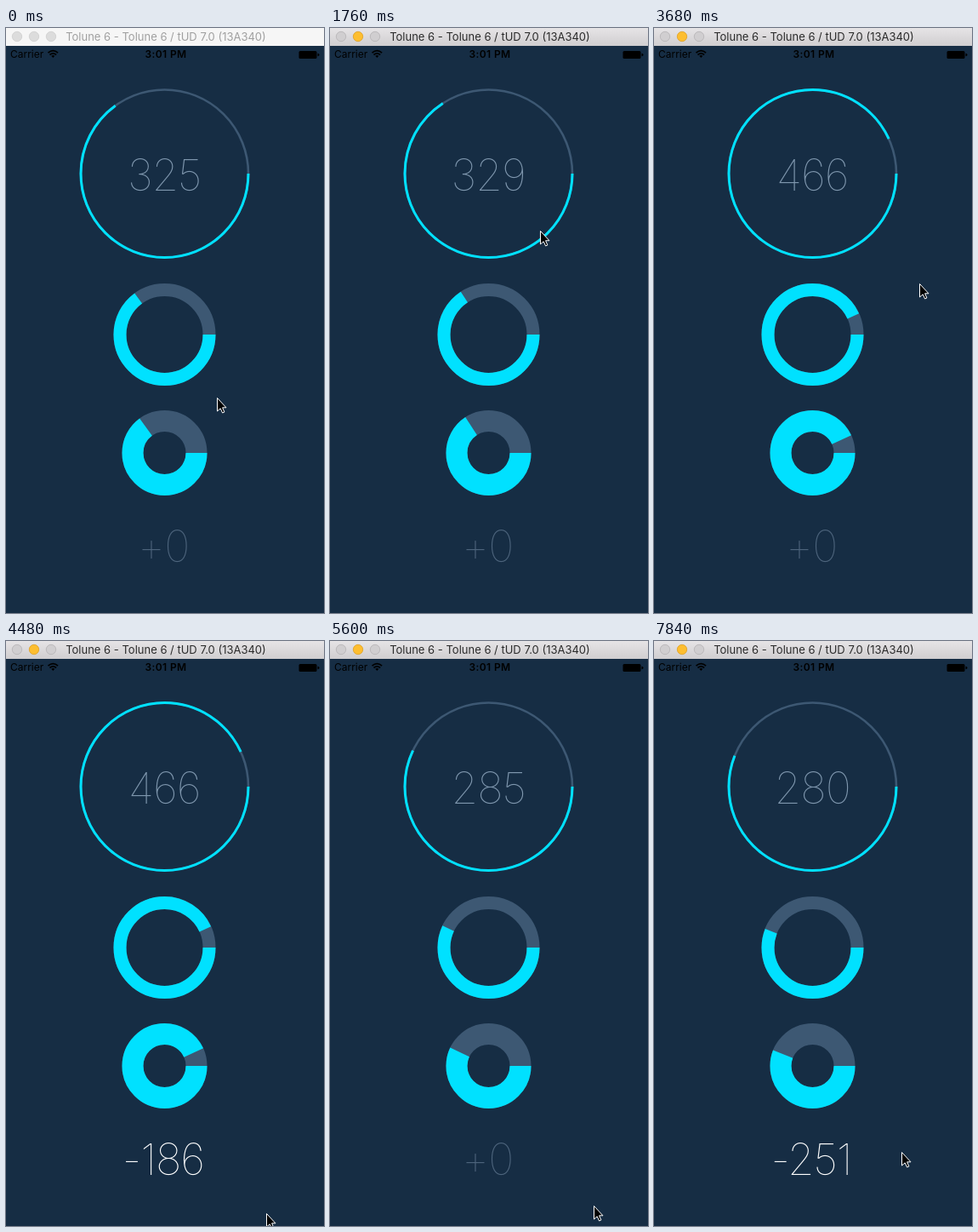
An HTML page for the animation above (8000 ms loop, 374 by 687 pixels).

```html
<!DOCTYPE html>
<html lang="en">
<head>
<meta charset="utf-8">
<style>
  html, body { margin: 0; width: 100%; height: 100%; overflow: hidden; background: #162d44; }
  svg { display: block; width: 374px; height: 687px; font-family: Inter, Roboto, sans-serif; }
  .big { font-size: 51px; font-weight: 100; letter-spacing: -1px; text-anchor: middle; }
  .track { fill: none; stroke: #3d5873; }
  .arc { fill: none; stroke: #00e1ff; }
</style>
</head>
<body>
<svg viewBox="0 0 374 687">
  <defs>
    <linearGradient id="active" x2="0" y2="1">
      <stop stop-color="#e6e4e6"/><stop offset="1" stop-color="#d0ced0"/>
    </linearGradient>
  </defs>
  <rect width="374" height="687" fill="#162d44"/>
  <rect id="bar" width="374" height="21"/>
  <g id="lights" stroke-width=".8"></g>
  <text id="title" x="188" y="15" font-size="13" text-anchor="middle">Tolune 6 - Tolune 6 / tUD 7.0 (13A340)</text>

  <text x="5" y="35.3" font-size="12">Carrier</text>
  <g fill="none" stroke="#000" stroke-width="1.7">
    <path d="M49.5 29.2Q55.3 24.2 61.1 29.2M51.5 31.5Q55.3 28.3 59.1 31.5"/>
    <path d="M53.3 32.8Q55.3 31.2 57.3 32.8L55.3 35Z" fill="#000" stroke="none"/>
  </g>
  <text x="188" y="35.3" font-size="12" font-weight="600" letter-spacing=".4" text-anchor="middle">3:01 PM</text>
  <rect x="344.5" y="27" width="21" height="9" rx="1.5"/>
  <path d="M366.5 29.7q2 0 2 1.8t-2 1.8z"/>

  <g id="rings"></g>
  <text id="total" class="big" x="186.2" y="191" fill="#7f97ae"></text>
  <text id="delta" class="big" x="185" y="626.5"></text>
  <path id="cursor" d="M.5.5V16L4.2 12.8L6.6 18L8.9 17L6.6 11.8H11Z" stroke="#fff"/>
</svg>
<script>
const LOOP = 8000, STEP = 160, MAX = 500;
const el = id => document.getElementById(id);

// cursor moves: start, end, x, y and, for a drag, the release time
const moves = [
  [160, 480, 248, 519],
  [480, 1300, 246, 237, 1640],
  [1700, 2400, 312, 300],
  [3900, 4480, 306, 672, 4720],
  [4800, 5600, 310, 663],
  [5600, 6880, 315, 98],
  [7040, 7840, 291, 600, LOOP]
];

el('rings').innerHTML = [[171, 98.5, 2.6, 3], [360, 52.5, 15, 15], [499, 37.5, 25, 25]]
  .map(([y, r, track, arc]) => {
    const ring = (cls, w) =>
      `<circle class="${cls}" cx="186.5" cy="${y}" r="${r}" stroke-width="${w}" pathLength="${MAX}"/>`;
    return ring('track', track) + ring('arc', arc);
  }).join('');
el('lights').innerHTML = [13, 33, 53].map(x => `<circle cx="${x}" cy="10" r="5.7"/>`).join('');
const arcs = document.querySelectorAll('.arc');
const lights = el('lights').children;

// eased progress from 0 to 1
function progress(t, start, end) {
  const u = Math.max(0, Math.min(1, (t - start) / (end - start)));
  return u < .5 ? 2 * u * u : 1 - 2 * (1 - u) ** 2;
}

// a drag shows half its distance, and adds it to the total once released
function stateAt(t) {
  let x = 248, y = 434, total = 325, delta = 0;
  for (const [start, end, toX, toY, release] of moves) {
    const u = progress(t, start, end);
    const half = (y - toY) / 2;
    x += (toX - x) * u;
    y += (toY - y) * u;
    if (!release) continue;
    if (t < release) delta += half * u;
    total += half * progress(t, release, release + 1000);
  }
  return { x, y, total, delta: Math.round(delta) };
}

function draw(t) {
  const { x, y, total, delta } = stateAt(t);
  el('cursor').setAttribute('transform', `translate(${x} ${y})`);
  el('total').textContent = Math.round(total);
  arcs.forEach(a => a.setAttribute('stroke-dasharray', `${total} ${MAX}`));
  el('delta').textContent = (delta < 0 ? '-' : '+') + Math.abs(delta);
  el('delta').setAttribute('fill', delta ? '#fff' : '#4d647c');

  const active = t >= moves[1][0];
  el('bar').setAttribute('fill', active ? 'url(#active)' : '#f6f6f6');
  el('title').setAttribute('fill', active ? '#2b2b2b' : '#a0a0a0');
  [...lights].forEach((c, i) => {
    const yellow = active && i === 1;
    c.setAttribute('fill', yellow ? '#fdbe30' : active ? '#d0ced0' : '#dcdcdc');
    c.setAttribute('stroke', yellow ? '#dfa023' : active ? '#b5b3b5' : '#cecece');
  });
}

const begin = performance.now();
function tick() {
  const t = (performance.now() - begin) % LOOP;
  draw(Math.floor(t / STEP) * STEP);
  requestAnimationFrame(tick);
}
tick();
</script>
</body>
</html>
```
